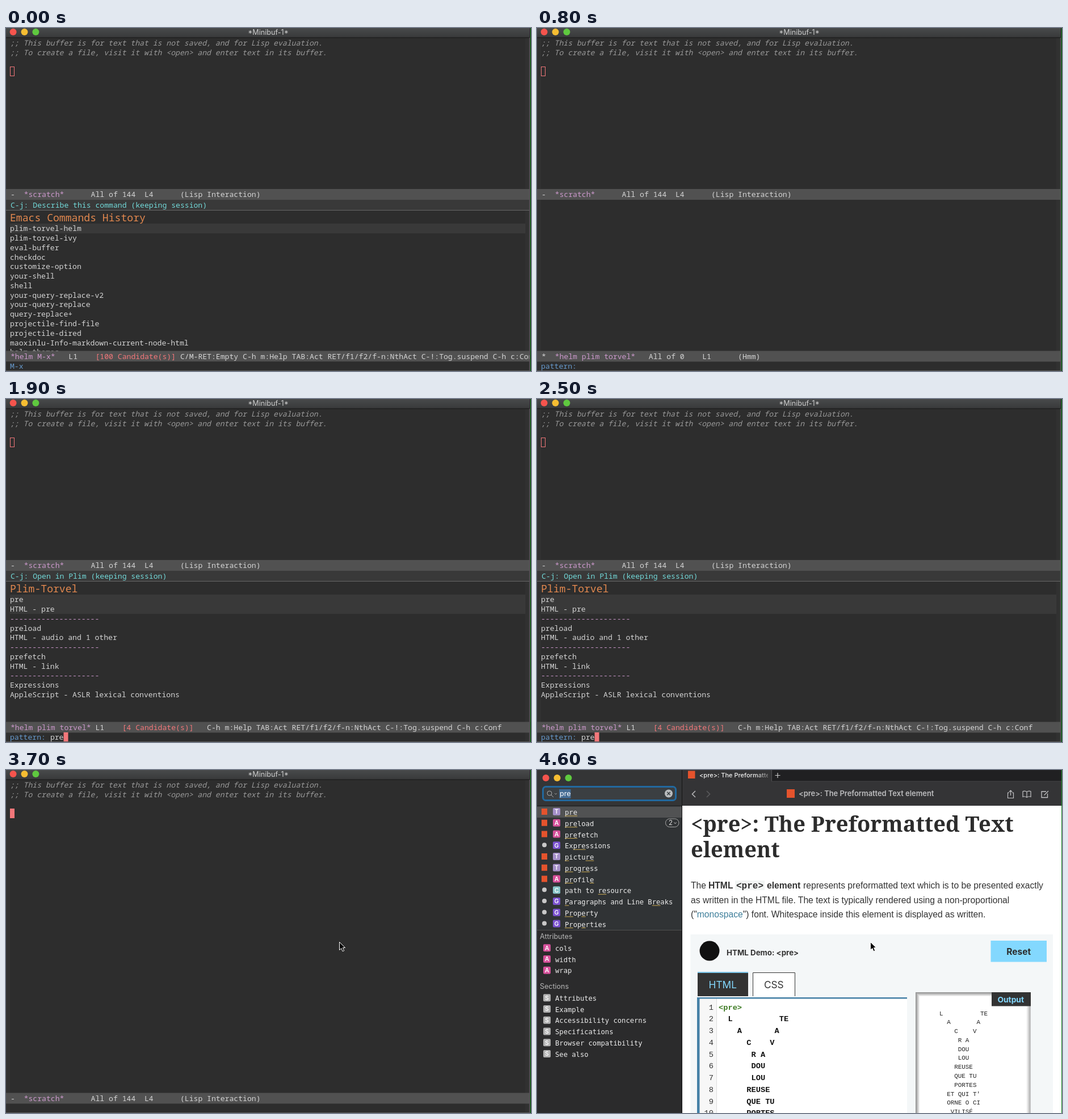
Animation, 925 px wide and 605 px high, one loop 4.7 s. Source, as an HTML page:

```html
<!DOCTYPE html>
<html lang="en">
<head>
<meta charset="utf-8">
<title>Documentation lookup</title>
<style>
html, body { margin: 0; width: 100%; height: 100%; overflow: hidden; background: #2d2d2d; }
svg { display: block; }
text { white-space: pre; }
.mono { font: 13.125px "Noto Sans Mono", monospace; fill: #d4d4d4; }
.head { font: 500 18.1px "Noto Sans Mono", monospace; fill: #e2884f; }
.note { font-style: italic; fill: #999; }
.ui { font-family: Inter, sans-serif; }
.list { font: 12.17px "DejaVu Sans Mono", monospace; fill: #ececec; }
.title { font: bold 38px "Noto Serif", serif; fill: #2c2c2c; }
.body { font: 15.67px "Liberation Sans", Arial, sans-serif; fill: #333; }
.strong { font-weight: bold; }
.code { font: bold 13.7px "Liberation Mono", monospace; fill: #111; }
.out { font: 10.9px "Liberation Mono", monospace; fill: #222; }
</style>
</head>
<body>
<svg id="stage" width="925" height="605" viewBox="0 0 925 605"></svg>
<script>
const LOOP = 4700, COL = 7.875, ROW = 16.77;
const PINK = '#cc99cc', RED = '#f2777a', BLUE = '#6699cc';

const esc = s => String(s).replace(/&/g, '&amp;').replace(/</g, '&lt;');
const rect = (x, y, w, h, fill, more = '') =>
  `<rect x="${x}" y="${y}" width="${w}" height="${h}" fill="${fill}" ${more}/>`;
const dot = (x, y, r, fill, more = '') => `<circle cx="${x}" cy="${y}" r="${r}" fill="${fill}" ${more}/>`;
const path = (d, stroke, more = '') => `<path d="${d}" fill="none" stroke="${stroke}" ${more}/>`;
const group = (id, ...parts) => `<g id="${id}">${parts.join('')}</g>`;
// Text is a string or a list of [colour, string] runs.
const text = (x, y, runs, cls, more = '') => {
  const inner = Array.isArray(runs)
    ? runs.map(([c, s]) => `<tspan ${c ? `style="fill:${c}"` : ''}>${esc(s)}</tspan>`).join('')
    : esc(runs);
  return `<text x="${x}" y="${y}" class="${cls}" ${more}>${inner}</text>`;
};
const ui = (x, y, s, size, fill, weight = 400, anchor = 'start') =>
  text(x, y, s, 'ui', `font-size="${size}" font-weight="${weight}" fill="${fill}" text-anchor="${anchor}"`);
const lights = (x, y) => ['#f5544d', '#f6bd32', '#5fc93f'].map((c, i) => dot(x + i * 19.9, y, 6, c)).join('');

// Editor
const modeline = (y, runs) => rect(0, y, 922, 19, '#515151') + text(8, y + 14, runs, 'mono');
const scratchLine = y => modeline(y,
  [['', '-  '], [PINK, '*scratch*'], ['', '      All of 144  L4      (Lisp Interaction)']]);
const rows = list => list.map((s, i) => text(7, 358.3 + i * ROW, s, 'mono',
  s[0] === '-' ? `style="fill:${PINK}"` : '')).join('');
const helmHead = (hint, title, selected) =>
  rect(0, 303, 922, 18, '#393939') + rect(0, 321, 922, 1, '#666') +
  text(8, 317, hint, 'mono', 'style="fill:#72d9d9"') + text(7, 341, title, 'head') +
  rect(7, 345, 908, selected * ROW + .5, '#393939');
const keys = 'C-h m:Help TAB:Act RET/f1/f2/f-n:NthAct C-!:Tog.suspend C-h c:Conf';
const rule = '-'.repeat(20);

const editor = group('editor',
  rect(0, 0, 925, 605, '#2d2d2d'),
  rect(0, 18, 7, 586, '#313131'), rect(915, 18, 8, 586, '#313131'),
  rect(0, 0, 925, 17, 'url(#bar)'), rect(0, 16.5, 925, 1, '#171717'),
  lights(12.6, 7),
  ui(462, 11.7, '*Minibuf-1*', 12.6, '#cfcfcf', 400, 'middle'),
  text(7, 31, ';; This buffer is for text that is not saved, and for Lisp evaluation.', 'mono note'),
  text(7, 47.8, ';; To create a file, visit it with <open> and enter text in its buffer.', 'mono note'),
  group('split', scratchLine(284), rect(7.5, 68.5, 7, 16, 'none', `stroke="${RED}"`)),
  group('commands',
    helmHead('C-j: Describe this command (keeping session)', 'Emacs Commands History', 1),
    rows(['plim-torvel-helm', 'plim-torvel-ivy', 'eval-buffer', 'checkdoc', 'customize-option',
      'your-shell', 'shell', 'your-query-replace-v2', 'your-query-replace', 'query-replace+',
      'projectile-find-file', 'projectile-dired', 'maoxinlu-Info-markdown-current-node-html', 'helm-themes']),
    modeline(569.5, [[PINK, '*helm M-x*'], ['', '   L1    '], [RED, '[100 Candidate(s)]'], ['', ' C/M-RET:Empty ' + keys]]),
    rect(0, 588.5, 922, 17, '#2d2d2d'),
    text(7, 601.3, 'M-x', 'mono', `style="fill:${BLUE}"`)),
  group('waiting',
    modeline(569.5, [['', '*  '], [PINK, '*helm plim torvel*'], ['', '   All of 0    L1      (Hmm)']])),
  group('results',
    helmHead('C-j: Open in Plim (keeping session)', 'Plim-Torvel', 2),
    rows(['pre', 'HTML - pre', rule, 'preload', 'HTML - audio and 1 other', rule,
      'prefetch', 'HTML - link', rule, 'Expressions', 'AppleScript - ASLR lexical conventions']),
    modeline(569.5, [[PINK, '*helm plim torvel*'], ['', ' L1    '], [RED, '[4 Candidate(s)]'], ['', '   ' + keys]])),
  group('prompt', text(7, 601.3, 'pattern:', 'mono', `style="fill:${BLUE}"`),
    text(7 + 9 * COL, 601.3, '', 'mono', 'id="typed"')),
  group('single', scratchLine(569.5)),
  rect(0, 0, 8, 17, RED, 'id="cursor"'),
  rect(0, 604, 923, 1, '#5a5a5a'), rect(922, 17, 1, 588, '#6a6a6a'), rect(923, 0, 2, 605, '#1c1c1c'));

// Documentation browser
const ORANGE = '#e5532d', KIND = { T: '#a48fc8', A: '#d5509a', G: '#7b52cf', C: '#88c5c9', S: '#b2b2b2' };
const badge = (x, y, k) => rect(x, y - 6.5, 13, 13, KIND[k], 'rx="2"') +
  ui(x + 6.5, y + 3.8, k, 10.5, '#fff', 600, 'middle');
// Each hit: mark, kind, label, then start and length of each matched run.
const hits = [
  ['h', 'T', 'pre', 0, 3], ['h', 'A', 'preload', 0, 3], ['h', 'A', 'prefetch', 0, 3],
  ['o', 'G', 'Expressions', 2, 3], ['h', 'T', 'picture', 0, 1, 5, 2], ['h', 'T', 'progress', 0, 2, 4, 2],
  ['h', 'A', 'profile', 0, 2, 6, 1], ['o', 'C', 'path to resource', 8, 2],
  ['o', 'G', 'Paragraphs and Line Breaks', 0, 1, 21, 2], ['o', 'G', 'Property', 0, 2, 4, 1],
  ['o', 'G', 'Properties', 0, 2, 4, 1]];
const hitRow = ([mark, kind, label, ...runs], i) => {
  const y = 74.5 + i * 19.75;
  let s = (mark === 'h' ? rect(8, y - 6.5, 10, 11, ORANGE) : dot(13, y - 1.5, 4, '#c8c8c8')) +
    badge(28, y - 1, kind) + text(49, y + 4.5, label, 'list');
  for (let k = 0; k < runs.length; k += 2)
    s += rect(49 + runs[k] * 7.327, y + 6, runs[k + 1] * 7.327, 1, '#cfae55');
  return s;
};
const items = (y0, kind, names) => names.map((s, i) =>
  badge(11, y0 - .5 + i * 19.75, kind) + text(32, y0 + 4.5 + i * 19.75, s, 'list')).join('');

const poem = ['  L          TE', '    A       A', '      C    V', '       R A', '       DOU', '       LOU',
  '      REUSE', '      QUE TU', '      PORTES', '    ET QUI T\'', '    ORNE O CI', '     VILISÉ'];
const codeRow = (s, i) => {
  const y = 422.5 + i * 20.75;
  return text(311, y, i + 1, 'code', 'text-anchor="end" style="font-weight:400;fill:#333"') +
    text(320, y, s, 'code', i ? '' : 'style="fill:#3c7a22"');
};

const sidebar = [
  rect(0, 0, 255, 605, '#2b2b2c'), rect(0, 0, 255, 63, '#343536'), rect(0, 63, 255, 219, '#303335'),
  rect(0, 62.5, 255, 1, '#1f2021'), rect(0, 282, 255, 1, '#505050'),
  lights(15.6, 14),
  rect(10.5, 29.5, 234, 24, '#3b3f42', 'rx="5" stroke="#22699f" stroke-width="3"'),
  rect(39, 34, 20.5, 16, '#436b93'),
  dot(22, 41, 4, 'none', 'stroke="#aaa"'), path('M25 44l4 4', '#aaa'), path('M31 41l2 2 2-2', '#999'),
  ui(40, 46, 'pre', 12.5, '#fff'),
  dot(232, 41.5, 7, '#b9bcbe'), path('M229.3 38.8l5.4 5.4m0-5.4l-5.4 5.4', '#3a3f42', 'stroke-width="1.5"'),
  rect(0, 64.5, 255, 19.5, '#515253'),
  ...hits.map(hitRow),
  rect(226.5, 86, 23.5, 14.5, 'none', 'rx="7.2" stroke="#aaa"'), ui(232, 97.3, '2', 11.5, '#ddd'),
  path('M241.5 92.5l2 2 2-2', '#ddd'),
  ui(5, 298, 'Attributes', 12.5, '#b6b6b6'), items(314.3, 'A', ['cols', 'width', 'wrap']),
  ui(5, 386, 'Sections', 12.5, '#b6b6b6'),
  items(402.3, 'S', ['Attributes', 'Example', 'Accessibility concerns', 'Specifications',
    'Browser compatibility', 'See also']),
  rect(255, 0, 1, 605, '#141414')];

const toolbar = [
  rect(256, 0, 668, 63, '#343436'), rect(413, 0, 511, 20, '#202022'),
  rect(413, 0, 1, 20, '#505052'), rect(413, 19.5, 511, 1, '#454547'),
  rect(266, 1.5, 12.5, 13.5, ORANGE), rect(440, 34, 14, 15, ORANGE),
  `<g clip-path="url(#tab)">${ui(286, 13, '<pre>: The Preformatted', 11, 'url(#fade)', 500)}</g>`,
  path('M419.5 9.5h9m-4.5-4.5v9', '#ccc', 'stroke-width="1.2"'),
  ui(461, 46.3, '<pre>: The Preformatted Text element', 12.9, '#bdbdbf', 600),
  path('M279 37l-5.5 5.5 5.5 5.5', '#b5b5b7', 'stroke-width="1.6"'),
  path('M299 37l5.5 5.5-5.5 5.5', '#5a5a5c', 'stroke-width="1.6"'),
  path('M832 40h-2.5v9.5h10v-9.5h-2.5M834.5 45v-9m-2.7 2.7l2.7-2.7 2.7 2.7', '#c4c4c6', 'stroke-width="1.2"'),
  path('M863 38.5q-3.5-2.5-7-.7v9.5q3.5-1.5 7 1q3.5-2.5 7-1v-9.5q-3.5-1.8-7 .7v9.8', '#c4c4c6', 'stroke-width="1.2"'),
  path('M897 38h-8v10.5h10.5v-7M893.5 44.5l7.5-7.5', '#c4c4c6', 'stroke-width="1.3"')];

const page = [
  rect(256, 63, 668, 542, '#fff'),
  text(271, 109, '<pre>: The Preformatted Text', 'title'), text(271, 154, 'element', 'title'),
  rect(349, 195, 52, 17, '#f2f5f4'),
  text(271, 209.3, 'The', 'body'),
  text(302, 209.3, 'HTML', 'body strong'),
  text(351, 209.3, '<pre>', 'code', 'style="font-size:16px;fill:#333"'),
  text(405, 209.3, 'element', 'body strong'),
  text(469, 209.3, 'represents preformatted text which is to be presented exactly', 'body'),
  text(271, 234.7, 'as written in the HTML file. The text is typically rendered using a non-proportional', 'body'),
  text(271, 259.7, [['', '("'], ['#3d7e9a', 'monospace'], ['', '") font. Whitespace inside this element is displayed as written.']], 'body'),
  rect(270.5, 290, 638.5, 315, '#f4f7f8'),
  dot(304, 319, 17.5, '#111'),
  ui(334, 326.5, 'HTML Demo: <pre>', 13.35, '#333', 700),
  rect(799.5, 301, 98.5, 37.5, '#83d8fe'), ui(848.7, 325.7, 'Reset', 15.5, '#2b2b2b', 700, 'middle'),
  rect(283, 356, 89, 43, '#333'), rect(283, 356, 89, 2, '#7cc6ea'),
  ui(327.3, 385, 'HTML', 17.3, '#83d8fe', 400, 'middle'),
  rect(380, 357, 75, 42, '#fff'), path('M380.5 399v-41.5h74v41.5', '#333'),
  ui(417.3, 385, 'CSS', 17.3, '#333', 400, 'middle'),
  rect(282, 401, 370, 204, '#fff'), rect(286, 403, 30, 202, '#f7f7f7'), rect(316, 403, 1, 202, '#ddd'),
  rect(282, 401, 370, 2.5, '#4480a6'), rect(282, 401, 4.5, 204, '#4480a6'),
  ...['<pre>', ...poem.slice(0, 9)].map(codeRow),
  rect(667, 392, 202.5, 220, '#fff'),
  ...[0, 1, 2, 3, 4, 5, 6].map(i => rect(667.5 + i, 392.5 + i, 201.5 - 2 * i, 240, 'none',
    `stroke="hsl(0 0% ${58 + i * 6}%)"`)),
  rect(801, 392, 69, 24.5, '#333'), ui(834.7, 409.8, 'Output', 13.8, '#83d8fe', 700, 'middle'),
  ...poem.map((s, i) => text(696, 432.5 + i * 15.78, s, 'out'))];

const stage = document.getElementById('stage');
stage.innerHTML = `<defs>
  <linearGradient id="bar" x2="0" y2="1"><stop stop-color="#484a4b"/><stop offset="1" stop-color="#38393a"/></linearGradient>
  <linearGradient id="fade" gradientUnits="userSpaceOnUse" x1="385" x2="410"><stop stop-color="#eee"/><stop offset="1" stop-color="#666"/></linearGradient>
  <clipPath id="tab"><rect x="256" width="151" height="20"/></clipPath></defs>` +
  editor + group('browser', ...sidebar, ...toolbar, ...page) +
  group('mouse', '<path d="M587.5 303.5v14l3.3-3 2.3 5.3 2.6-1.1-2.3-5.2h4.2z" fill="#000" stroke="#fff"/>') +
  rect(924, 0, 1, 605, '#1a8a22');

const $ = id => document.getElementById(id);
const show = (id, on) => $(id).style.display = on ? '' : 'none';
const OPEN = 300, KEYS = [1000, 1300, 1500], FOUND = 1700, CLOSE = 3500, POINTER = 3600, SWITCH = 3800;

// The cursor stays solid for half a second after input, then blinks.
function blink(t) {
  const last = [OPEN, ...KEYS, CLOSE].filter(k => k <= t).pop();
  return last === undefined ? t >= 200 : Math.floor((t - last) / 500) % 2 === 0;
}

function draw(t) {
  show('split', t < CLOSE);
  show('commands', t < OPEN);
  show('waiting', t >= OPEN && t < FOUND);
  show('results', t >= FOUND && t < CLOSE);
  show('prompt', t >= OPEN && t < CLOSE);
  show('single', t >= CLOSE);
  show('mouse', t >= POINTER);
  show('browser', t >= SWITCH);
  show('cursor', blink(t));
  const count = KEYS.filter(k => k <= t).length;
  $('typed').textContent = 'pre'.slice(0, count);
  const column = t < OPEN ? 4 : t < CLOSE ? 9 + count : 0;
  $('cursor').setAttribute('x', 7 + column * COL);
  $('cursor').setAttribute('y', t < CLOSE ? 588 : 68);
}

const start = performance.now();
(function tick() {
  draw((performance.now() - start) % LOOP);
  requestAnimationFrame(tick);
})();
</script>
</body>
</html>
```
